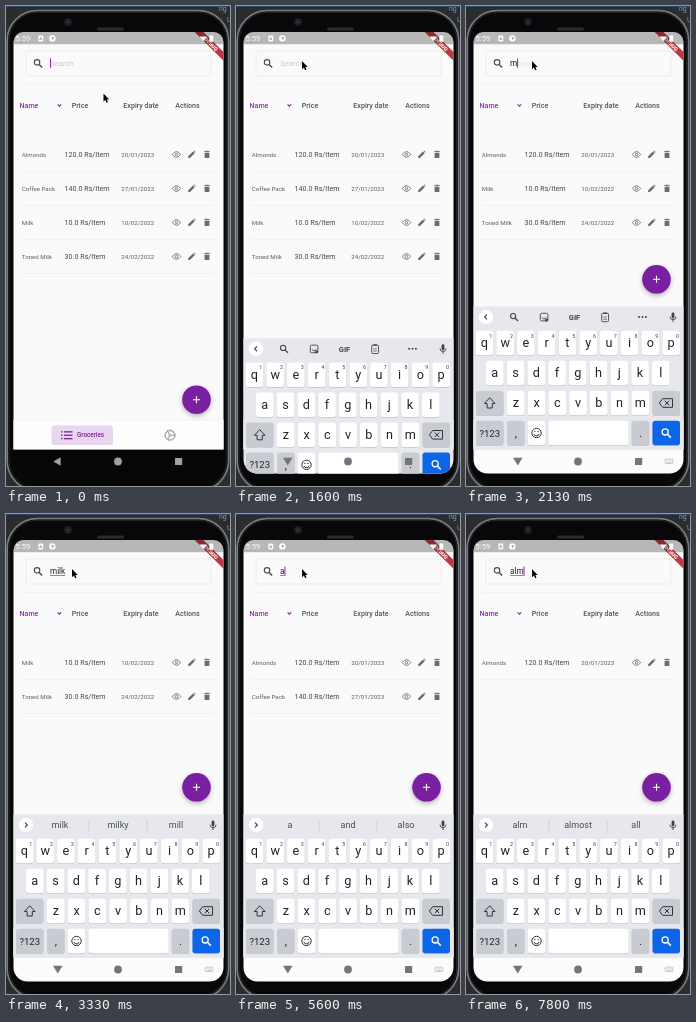
An HTML page with a canvas that plays this animation: 224 by 480 pixels, repeating every 8 s.

```html
<!DOCTYPE html>
<html lang="en">
<head>
<meta charset="utf-8">
<title>Grocery search</title>
<style>
  html, body { margin: 0; width: 100%; height: 100%; overflow: hidden; background: #2b2c2e; }
  canvas { display: block; width: 224px; height: 480px; }
</style>
</head>
<body>
<canvas id="stage"></canvas>
<script>
const W = 224, H = 480, LOOP = 8000;
const KEYBOARD_START = 1494, KEYBOARD_TIME = 250;
const canvas = document.getElementById('stage');
const c = canvas.getContext('2d');
const dpr = window.devicePixelRatio || 1;
canvas.width = W * dpr;
canvas.height = H * dpr;

const PURPLE = '#7b1fa2', PAPER = '#fafafa', GREY = '#6c6c6e', KEYBG = '#e6e8ed', DARKKEY = '#c9cbd2';
const HEAD = '#55555a', SMALL = '#5c5c60', INK = '#202226';
const ITEMS = [
  ['Almonds', '120.0 Rs/Item', '20/01/2023'],
  ['Coffee Pack', '140.0 Rs/Item', '27/01/2023'],
  ['Milk', '10.0 Rs/Item', '10/02/2022'],
  ['Toned Milk', '30.0 Rs/Item', '24/02/2022']
];
// time, query, suggestions (none: toolbar)
const TYPING = [
  [0, ''], [2070, 'm'],
  [2330, 'mi', 'mi mine might'], [2600, 'mil', 'mil mile mild'],
  [2870, 'milk', 'milk milky mill'], [3870, 'mil', 'mil mile mild'],
  [4000, 'mi', 'mi mine might'], [4130, 'm', 'm my me'], [4470, ''],
  [5400, 'a', 'a and also'], [5730, 'al', 'al all also'],
  [5870, 'alm', 'alm almost all'], [6130, 'almo', 'almo almost also'],
  [6270, 'almod', 'almod almost mod'], [6870, 'almo', 'almo almost also'],
  [7730, 'alm', 'alm almost all']
];
const CARET_OFF = [[330, 830], [1270, 1740], [3330, 3870], [4870, 5400], [7530, 7730]];

const clamp = v => Math.max(0, Math.min(1, v));

function text(s, x, y, size, color, align = 'left', weight = 400) {
  c.font = `${weight} ${size}px Roboto, sans-serif`;
  c.fillStyle = color;
  c.textAlign = align;
  c.fillText(s, x, y);
}
function box(x, y, w, h, r, fill, stroke, lw = 1) {
  c.beginPath();
  c.roundRect(x, y, w, h, r);
  if (fill) { c.fillStyle = fill; c.fill(); }
  if (stroke) { c.strokeStyle = stroke; c.lineWidth = lw; c.stroke(); }
}
function disc(x, y, r, fill) {
  c.beginPath();
  c.arc(x, y, r, 0, 7);
  c.fillStyle = fill;
  c.fill();
}
function ring(x, y, r, color, lw = 1) {
  c.beginPath();
  c.arc(x, y, r, 0, 7);
  c.strokeStyle = color;
  c.lineWidth = lw;
  c.stroke();
}
function trace(pts) {
  c.beginPath();
  for (let i = 0; i < pts.length; i += 2) c.lineTo(pts[i], pts[i + 1]);
}
function line(color, lw, ...pts) {
  trace(pts);
  c.strokeStyle = color;
  c.lineWidth = lw;
  c.stroke();
}
function poly(fill, ...pts) {
  trace(pts);
  c.closePath();
  c.fillStyle = fill;
  c.fill();
}
function at(x, y, draw) {
  c.save();
  c.translate(x, y);
  draw();
  c.restore();
}

function magnifier(x, y, s, color) {
  at(x, y, () => {
    c.scale(s, s);
    ring(-1, -1, 2.9, color, 1.2);
    line(color, 1.5, 1.2, 1.2, 4.4, 4.4);
  });
}
function eye(x, y) {
  at(x, y, () => {
    c.beginPath();
    c.moveTo(-4.2, 0);
    c.quadraticCurveTo(0, -5.8, 4.2, 0);
    c.quadraticCurveTo(0, 5.8, -4.2, 0);
    c.strokeStyle = GREY;
    c.lineWidth = .9;
    c.stroke();
    ring(0, 0, 1.2, GREY, .9);
  });
}
function pencil(x, y) {
  at(x, y, () => {
    poly(GREY, -3.5, 3.5, -3.5, 1.8, 1.3, -3, 3, -1.3, -1.8, 3.5);
    poly(GREY, 1.8, -3.4, 2.5, -3.9, 3.9, -2.5, 3.5, -1.8);
  });
}
function trash(x, y) {
  box(x - 2.4, y - 1.8, 4.8, 5.4, .7, GREY);
  c.fillRect(x - 2.9, y - 3.3, 5.8, .9);
  c.fillRect(x - 1.2, y - 3.8, 2.4, .8);
}
function mic(x, y) {
  box(x - 1.4, y - 5, 2.8, 6, 1.4, '#444');
  c.beginPath();
  c.arc(x, y - .8, 3, 0, Math.PI);
  c.strokeStyle = '#444';
  c.lineWidth = .9;
  c.stroke();
  line('#444', 1, x, y + 2.2, x, y + 4.4);
}

function phoneBody() {
  c.fillStyle = '#2b2c2e';
  c.fillRect(0, 0, W, H);
  c.fillStyle = '#2c4a74';
  c.fillRect(0, 0, W, .8);
  text('ng', 213, 5, 7, '#7d9cc4');
  text('U', 221, 16, 7, '#7d9cc4');
  box(1.2, 4.6, 221.4, 480, 30, '#08080a', '#77797c', 1.8);
  box(3, 6.4, 217.8, 476.4, 28, null, '#1f2022', 1.4);
  disc(62, 16, 4, '#1d1e22');
  disc(62, 16, 1.6, '#33363d');
  box(91, 21.5, 27, 3, 1.5, '#2a2b2d');
}

function debugRibbon() {
  at(217.5, 26, () => {
    c.rotate(Math.PI / 4);
    c.fillStyle = '#bf3742';
    c.fillRect(-20.4, 14.2, 40.8, 6.2);
    text('DEBUG', 0, 19.2, 5.2, '#fff', 'center', 900);
  });
}

function statusBar() {
  c.fillStyle = 'rgba(0,0,0,.27)';
  c.fillRect(7, 26, 211, 12.2);
  text('5:59', 9.6, 35, 7.6, '#fff');
  box(32.4, 29.5, 4.8, 6, 1, '#fff');
  text('A', 34.8, 34.3, 4.4, '#999', 'center', 700);
  disc(46.4, 32.4, 3.2, '#fff');
  poly('#aaa', 45.4, 31, 48.4, 31, 46.4, 34.5);
  poly('#fff', 193.5, 30.5, 201, 30.5, 197.2, 35.3);
  box(203.4, 29.6, 3.8, 6.2, .6, '#fff');
}

function searchField(t, state) {
  const [since, query, hints] = state;
  box(20, 45, 185, 25, 2, PAPER, '#e9e9ea', .8);
  magnifier(32, 57.3, .95, '#4a4a4a');
  let hint = query ? 0 : 1;
  if (query.length === 1 && t < 3000) hint = 1 - clamp((t - since) / 160);
  if (!query && since) hint = clamp((t - since) / 160);
  if (hint) {
    c.globalAlpha = hint;
    text('Search', 44.3, 60.2, 7.6, '#cbcbcd');
    c.globalAlpha = 1;
  }
  text(query, 44, 60.2, 8.15, '#222');
  const end = 44 + c.measureText(query).width;
  if (hints) {
    c.fillStyle = '#444';
    c.fillRect(44, 61.2, end - 44, .6);
  }
  if (!CARET_OFF.some(([a, b]) => t >= a && t < b)) {
    c.fillStyle = '#8e24aa';
    c.fillRect(end, 52.5, 1, 9.3);
  }
}

function table(query) {
  text('Name', 13.5, 101.7, 7.13, '#9030ac', 'left', 500);
  line('#8e24aa', 1.2, 51.6, 98.4, 53.4, 100.2, 55.2, 98.4);
  text('Price', 65.8, 101.7, 7.13, HEAD, 'left', 500);
  text('Expiry date', 117.3, 101.7, 7.13, HEAD, 'left', 500);
  text('Actions', 169.3, 101.7, 7.13, HEAD, 'left', 500);
  line('#efeff0', .6, 15, 78.5, 208, 78.5);
  const rows = ITEMS.filter(r => r[0].toLowerCase().includes(query));
  rows.forEach(([name, price, date], i) => {
    const y = 148.5 + 34 * i;
    text(name, 15.8, y + 2.2, 6.15, SMALL);
    text(price, 58.6, y + 2.5, 7.13, '#46464b');
    text(date, 115.3, y + 2, 6.2, SMALL);
    eye(170.5, y);
    pencil(185.7, y);
    trash(201, y);
    line('#ebebec', .6, 15, y + 17, 208, y + 17);
  });
}

function addButton(y) {
  c.save();
  c.shadowColor = 'rgba(0,0,0,.28)';
  c.shadowBlur = 5 * dpr;
  c.shadowOffsetY = 2 * dpr;
  disc(190.5, y, 14.3, PURPLE);
  c.restore();
  line('#fff', 1.1, 187, y, 194, y);
  line('#fff', 1.1, 190.5, y - 3.5, 190.5, y + 3.5);
}

function tabs() {
  c.fillStyle = '#fdfdfd';
  c.fillRect(7, 414, 211, 29.5);
  line('#eeeeef', .7, 7, 414, 218, 414);
  box(45.5, 419.5, 61.5, 19.5, 3, '#e7d6ee');
  for (let i = -1; i < 2; i++) {
    c.fillStyle = PURPLE;
    c.fillRect(55, 428.6 + i * 3.4, 1.5, 1.3);
    c.fillRect(58, 428.6 + i * 3.4, 8.5, 1.3);
  }
  text('Groceries', 71, 431.4, 6.3, PURPLE, 'left', 500);
  at(164, 429.3, () => {
    ring(0, 0, 4.6, '#8b8b8e', .9);
    c.setLineDash([1.2, 1.2]);
    ring(0, 0, 5.4, '#8b8b8e', .8);
    c.setLineDash([]);
    ring(0, 0, 1.2, '#8b8b8e', .8);
    for (let i = 0; i < 3; i++) {
      line('#8b8b8e', .8, 1.2, 0, 4.4, 0);
      c.rotate(Math.PI * 2 / 3);
    }
  });
}

function toolbar(hints) {
  disc(20, 311, 7.2, '#fff');
  const d = hints ? 1 : -1;
  line('#444', 1.2, 20 - d, 308.6, 20 + 1.3 * d, 311, 20 - d, 313.4);
  mic(207, 311.5);
  if (hints) {
    hints.split(' ').forEach((s, i) => text(s, 54 + 58 * i, 314.2, 9, '#4a4d52', 'center'));
    line('#c6c9ce', .7, 83, 305, 83, 317);
    line('#c6c9ce', .7, 141, 305, 141, 317);
    return;
  }
  magnifier(48, 311, .9, '#444');
  box(74.3, 307.3, 7.6, 7.6, 1.4, null, '#444', .9);
  c.beginPath();
  c.arc(78, 311, 2, .2, Math.PI - .2);
  c.stroke();
  disc(80.7, 314, 1.5, '#444');
  text('GIF', 108.5, 313.7, 7.5, '#444', 'center', 700);
  box(135.7, 307.3, 6.8, 8.4, 1, null, '#444', .9);
  line('#444', 1.5, 137.5, 307.2, 140.7, 307.2);
  line('#444', .7, 137.4, 311, 140.8, 311);
  line('#444', .7, 137.4, 313.2, 140.8, 313.2);
  for (let i = -1; i < 2; i++) disc(176.5 + i * 3.4, 311, 1, '#444');
}

function key(x, y, w, fill = '#fff') {
  box(x, y - 11.6, w, 24.6, 2.8, '#c3c6cc');
  box(x, y - 12.3, w, 24.6, 2.8, fill);
}
function keyRow(letters, x0, y, numbered) {
  [...letters].forEach((ch, i) => {
    const x = x0 + 20.75 * i;
    key(x - 8.8, y, 17.6);
    text(ch, x, y + 4.2, 12.7, INK, 'center');
    if (numbered) text((i + 1) % 10, x + 6.3, y - 5.5, 5.4, '#404348', 'center');
  });
}

function keyboard(offset, hints) {
  at(0, offset, () => {
    c.fillStyle = KEYBG;
    c.fillRect(7, 300.5, 211, 143.5);
    c.fillStyle = '#fcfcfc';
    c.fillRect(7, 444, 211, 30);
    toolbar(hints);
    keyRow('qwertyuiop', 18.4, 337, true);
    keyRow('asdfghjkl', 28.8, 367);
    keyRow('zxcvbnm', 49.8, 397);
    key(10, 397, 27.5, DARKKEY);
    trace([23.7, 391.8, 29, 397.5, 26.3, 397.5, 26.3, 402, 21.1, 402, 21.1, 397.5, 18.4, 397.5]);
    c.closePath();
    c.strokeStyle = '#333';
    c.lineWidth = 1;
    c.stroke();
    key(186.5, 397, 27.5, DARKKEY);
    trace([193.4, 397, 196.7, 392.7, 206.5, 392.7, 206.5, 401.3, 196.7, 401.3]);
    c.closePath();
    c.strokeStyle = '#333';
    c.stroke();
    line('#333', 1, 198.8, 394.8, 203.2, 399.2);
    line('#333', 1, 203.2, 394.8, 198.8, 399.2);
    key(10, 427, 27.5, DARKKEY);
    text('?123', 23.8, 430.5, 9.6, INK, 'center');
    key(41, 427, 17.6, DARKKEY);
    text(',', 49.8, 431, 11.5, INK, 'center');
    key(61.7, 427, 17.6);
    ring(70.5, 427, 4.7, '#333', 1);
    disc(68.9, 425.6, .7, '#333');
    disc(72.1, 425.6, .7, '#333');
    c.beginPath();
    c.arc(70.5, 427.4, 2.6, .2, Math.PI - .2);
    c.stroke();
    key(82.4, 427, 80.2);
    key(165.7, 427, 17.6, DARKKEY);
    text('.', 174.5, 430.5, 11.5, INK, 'center');
    key(186.5, 427, 27.5, '#0d65e8');
    magnifier(200.2, 427, 1.05, '#fff');
  });
}

function navBar(t, open) {
  const color = open ? '#747577' : '#a0a0a2';
  if (open) poly(color, 47, 451.8, 56.5, 451.8, 51.8, 459.4);
  else poly(color, 47.3, 455.5, 54.7, 451.2, 54.7, 459.8);
  disc(112, 455.5, 3.9, color);
  box(169, 451.9, 7.2, 7.2, .5, color);
  if (t < 1470 || (open && t < 1700)) return;
  const faint = open ? '#b4b4b7' : color;
  box(199.2, 453.2, 7.6, 4.4, .6, null, faint, .7);
  c.fillStyle = faint;
  for (let i = 0; i < 3; i++) c.fillRect(200.6 + i * 2, 454.4, 1, 1);
  c.fillRect(201.2, 456.1, 3.8, .7);
}

function pointer(t) {
  const p = clamp((t - 40) / 1180), e = p * p * (3 - 2 * p), q = 1 - e;
  const x = q * q * 97.5 + 2 * q * e * 72 + e * e * 66;
  const y = q * q * 87.5 + 2 * q * e * 50 + e * e * 55;
  at(x, y, () => {
    trace([0, 0, 0, 8.2, 1.9, 6.5, 3.1, 9.2, 4.5, 8.6, 3.3, 6, 5.7, 5.9]);
    c.closePath();
    c.strokeStyle = '#fff';
    c.lineWidth = 1;
    c.stroke();
    c.fillStyle = '#050505';
    c.fill();
  });
}

function draw(t) {
  const state = TYPING.filter(s => s[0] <= t).pop();
  const open = t >= KEYBOARD_START;
  const slide = clamp((t - KEYBOARD_START) / KEYBOARD_TIME);
  c.setTransform(dpr, 0, 0, dpr, 0, 0);
  c.textBaseline = 'alphabetic';
  phoneBody();
  c.save();
  c.beginPath();
  c.roundRect(7.5, 26, 210, 441.5, [10, 10, 14, 14]);
  c.clip();
  c.fillStyle = PAPER;
  c.fillRect(7, 26, 211, 417.5);
  c.fillStyle = '#060608';
  c.fillRect(7, 443.5, 211, 26);
  searchField(t, state);
  table(state[1]);
  tabs();
  addButton(slide < 1 ? 393.7 : 273.3);
  debugRibbon();
  statusBar();
  if (open) keyboard(170 * (1 - slide) ** 3, state[2]);
  navBar(t, open);
  c.restore();
  pointer(t);
}

const start = performance.now();
function tick() {
  draw((performance.now() - start) % LOOP);
  requestAnimationFrame(tick);
}
tick();
</script>
</body>
</html>
```
